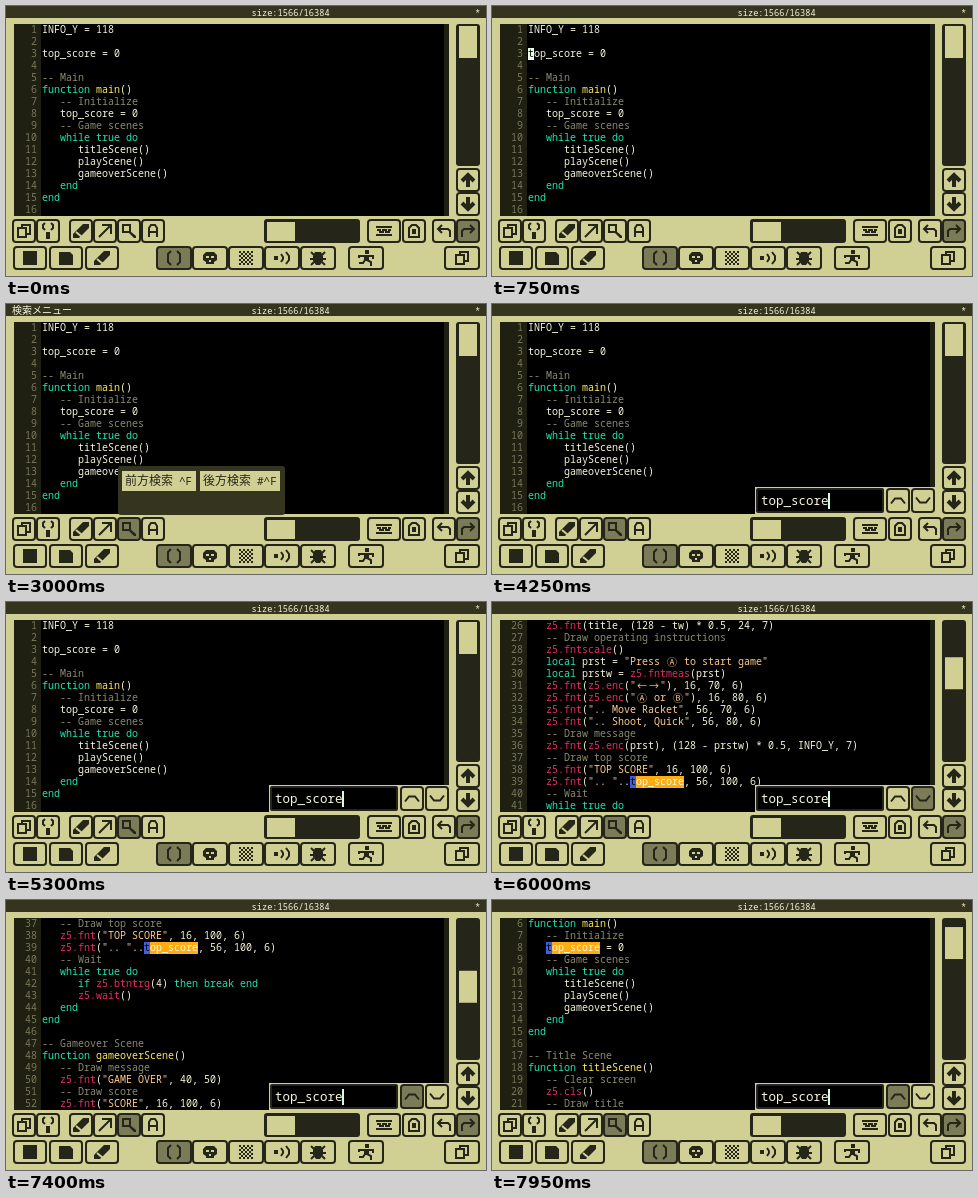
An HTML page with a canvas that plays this animation: 480x270 px, repeating every 8 s.

```html
<!DOCTYPE html>
<html lang="ja">
<head>
<meta charset="utf-8">
<title>Code search</title>
<style>
  html, body { margin: 0; width: 100%; height: 100%; overflow: hidden; background: #d0d094; }
  canvas { display: block; width: 480px; height: 270px; }
</style>
</head>
<body>
<canvas id="stage" width="480" height="270"></canvas>
<script>
const ctx = document.getElementById('stage').getContext('2d');
const LOOP = 8000, ROW = 12, COL = 6, LEFT = 36, TOP = 18, ROWS = 16;
const QUERY = 'top_score';
const MONO = '"Noto Sans Mono", monospace';
const WIDE = '"Noto Sans CJK JP", "Noto Sans CJK", sans-serif';
const INK = '#25251a', BAR = '#34341f', PAPER = '#d0d094', DIM = '#7b7b58', PALE = '#f6f5da';
const MENU_OPEN = 2500, MENU_CLOSE = 3500;

// Blocks of script, keyed by the number of their first line.
const blocks = {
1: `INFO_Y = 118

top_score = 0

-- Main
function main()
   -- Initialize
   top_score = 0
   -- Game scenes
   while true do
      titleScene()
      playScene()
      gameoverScene()
   end
end

-- Title Scene
function titleScene()
   -- Clear screen
   z5.cls()
   -- Draw title`,
26: `   z5.fnt(title, (128 - tw) * 0.5, 24, 7)
   -- Draw operating instructions
   z5.fntscale()
   local prst = "Press Ⓐ to start game"
   local prstw = z5.fntmeas(prst)
   z5.fnt(z5.enc("←→"), 16, 70, 6)
   z5.fnt(z5.enc("Ⓐ or Ⓑ"), 16, 80, 6)
   z5.fnt(".. Move Racket", 56, 70, 6)
   z5.fnt(".. Shoot, Quick", 56, 80, 6)
   -- Draw message
   z5.fnt(z5.enc(prst), (128 - prstw) * 0.5, INFO_Y, 7)
   -- Draw top score
   z5.fnt("TOP SCORE", 16, 100, 6)
   z5.fnt(".. "..top_score, 56, 100, 6)
   -- Wait
   while true do
      if z5.btntrg(4) then break end
      z5.wait()
   end
end

-- Gameover Scene
function gameoverScene()
   -- Draw message
   z5.fnt("GAME OVER", 40, 50)
   -- Draw score
   z5.fnt("SCORE", 16, 100, 6)`,
59: `   -- Wait
   z5.wait(30 * 3)
end

-- Play Scene
function playScene()
   z5.cls()
   z5.fnt("PLAY", 40, 50)
   z5.wait()
   while true do
      if z5.btntrg(4) then break end
      z5.wait()
   end
   top_score = top_score + 100
end
`};
const script = [];
for (const [first, text] of Object.entries(blocks))
  text.split('\n').forEach((line, i) => script[+first + i] = line);

// Caret moves: the pressed arrow, the top line and the caret cell.
const steps = [
  { at: -500, top: 1, line: 3, col: 0 },
  { at: 5500, press: 'down', top: 1, line: 8, col: 3 },
  { at: 6000, press: 'down', top: 26, line: 39, col: 17 },
  { at: 6450, press: 'down', top: 59, line: 72, col: 3 },
  { at: 7400, press: 'up', top: 37, line: 39, col: 17 },
  { at: 7900, press: 'up', top: 6, line: 8, col: 3 },
];

const syntax = [
  [/^--.*/, '#8a8a70'],
  [/^"[^"]*"/, '#ffca8a'],
  [/^z5\.\w+/, '#e62c62'],
  [/^(function|local|while|do|end|if|then|break|true)\b/, '#1fe4ae'],
  [/^\w+/, PALE],
  [/^./u, PALE],
];

function box(x, y, w, h, color, r = 0) {
  ctx.fillStyle = color;
  ctx.beginPath();
  ctx.roundRect(x, y, w, h, r);
  ctx.fill();
}

function label(text, x, y, size, color, family = MONO) {
  ctx.font = `${size}px ${family}`;
  ctx.fillStyle = color;
  ctx.fillText(text, x, y);
}

function codeLine(line, y, lit, caret) {
  const marks = [];
  if (lit) for (let i = line.indexOf(QUERY); i >= 0; i = line.indexOf(QUERY, i + 1)) {
    marks.push(i);
    box(LEFT + i * COL, y, QUERY.length * COL, ROW, '#ffab12');
  }
  if (caret >= 0) box(LEFT + caret * COL, y, COL, ROW, lit ? '#405cec' : '#eaffe8');
  let rest = line, col = 0, named = false;
  while (rest) {
    const [rule, base] = syntax.find(([re]) => re.test(rest));
    const token = rest.match(rule)[0];
    const color = named && /\w/.test(token) ? '#ffe95c' : base;
    if (token.trim()) named = token === 'function';
    for (const ch of token) {
      const wide = ch > '\u2000';
      const marked = marks.some(m => col >= m && col < m + QUERY.length);
      const ink = col === caret ? '#0c0c04' : marked ? '#fffbe0' : color;
      const x = LEFT + col * COL;
      if (wide) label(ch, x + 1, y + 9.5, 10, ink, WIDE);
      else if (ch !== ' ') label(ch, x, y + 9, 10, ink);
      col += wide ? 2 : 1;
    }
    rest = rest.slice(token.length);
  }
}

// Icon outlines around their centre; f = filled, s = stroked, c = cut out.
const icons = {
  copy: { s: 'M-2-3V-6H6V3H2M-6-3H2V6H-6Z' },
  braces: { s: 'M-3-8L-5-6V-3L-3-1M3-8L5-6V-3L3-1M-1 2H1V7H-1Z' },
  pencil: { f: 'M-8 7V3L2-7H8V-3L-2 7Z', c: 'M-5 1L1 6' },
  arrow: { s: 'M-6 6L5-5M-3-6H6V3' },
  find: { s: 'M-6-6H1V1H-6Z', f: 'M1 0L7 5V7H5L0 2Z' },
  letter: { s: 'M-4 6V-3L-2-6H2L4-3V6M-4 1H4' },
  keys: { s: 'M-8-4H8M-8 4H8M-7-1H-4V1H-1V-1H2V1H5V-1H7' },
  bag: { s: 'M-5 6V-3L-2-6H2L5-3V6Z', f: 'M-2-2H2V3H-2Z' },
  undo: { s: 'M-2-6L-6-2L-2 2M-6-2H4L6 0V6' },
  redo: { s: 'M2-6L6-2L2 2M6-2H-4L-6 0V6' },
  mark: { f: 'M-7-7H7V7H-7Z' },
  file: { f: 'M-7-6H4L7-3V7H-7Z' },
  parens: { s: 'M-3-7L-6-4V4L-3 7M3-7L6-4V4L3 7' },
  skull: { f: 'M-7-3L-4-6H4L7-3V2L4 4V6H-4V4L-7 2Z', c: 'M-4-1H-1M1-1H4M-1 3H1' },
  sound: { f: 'M-8-2H-4V2H-8Z', s: 'M-1-4L1-1V1L-1 4M4-6L7-2V2L4 6' },
  bug: { f: 'M-3-6H3L5-2V3L2 7H-2L-5 3V-2Z', s: 'M-7-6L-4-3M7-6L4-3M-8 1H8M-7 7L-4 4M7 7L4 4' },
  run: { f: 'M-1-8H3V-4H-1ZM-2-3H3V3H-2Z', s: 'M-7 0V-2H7V1M1 2L5 4V8M-1 2L-3 5H-7' },
  up: { s: 'M0 7V-5M-6 1L0-5L6 1', width: 4 },
  down: { s: 'M0-7V5M-6-1L0 5L6-1', width: 4 },
  prev: { s: 'M-7 3L-3-2H3L7 3' },
  next: { s: 'M-7-3L-3 2H3L7-3' },
};

function icon(name, x, y) {
  ctx.save();
  ctx.translate(x, y);
  if (name === 'grid') {
    for (let i = 0; i < 49; i += 2) box(i % 7 * 2 - 7, Math.floor(i / 7) * 2 - 7, 2, 2, INK);
  } else {
    const { s, f, c, width = 2 } = icons[name];
    ctx.lineWidth = width;
    ctx.strokeStyle = ctx.fillStyle = INK;
    if (f) ctx.fill(new Path2D(f));
    if (s) ctx.stroke(new Path2D(s));
    ctx.strokeStyle = PAPER;
    if (c) ctx.stroke(new Path2D(c));
  }
  ctx.restore();
}

function button(name, cx, cy, w, h, dim) {
  const x = cx - w / 2, y = cy - h / 2;
  box(x, y, w, h, INK, 4);
  box(x + 2, y + 2, w - 4, h - 4, dim ? DIM : PAPER, 2);
  icon(name, cx, cy);
}

const row = (names, x, gap, y, w, dimmed) =>
  names.split(' ').forEach((name, i) => button(name, x + i * gap, y, w, 24, name === dimmed));

function toolbars(searching) {
  row('copy braces', 18, 24, 225, 24);
  row('pencil arrow find letter', 75, 24, 225, 24, searching && 'find');
  box(258, 213, 96, 24, INK, 3);
  box(261, 216, 28, 19, PAPER);
  button('keys', 378, 225, 34, 24);
  button('bag', 408, 225, 24, 24);
  row('undo redo', 438, 24, 225, 24, 'redo');
  row('mark file pencil', 24, 36, 252, 34);
  row('parens skull grid sound bug', 168, 36, 252, 36, 'parens');
  button('run', 360, 252, 36, 24);
  button('copy', 456, 252, 36, 24);
}

function editor(t, step) {
  box(8, TOP, 435, ROWS * ROW, '#1f1f12');
  box(LEFT - 1, TOP, 403, ROWS * ROW, '#000');
  const caretOn = (t - step.at) % 1000 < 500;
  for (let i = 0; i < ROWS; i++) {
    const n = step.top + i, y = TOP + i * ROW;
    ctx.textAlign = 'right';
    label(n, 31, y + 9, 10, '#78785a');
    ctx.textAlign = 'left';
    codeLine(script[n] || '', y, !!step.press, caretOn && n === step.line ? step.col : -1);
  }
  box(450, TOP, 24, 142, INK, 3);
  box(453, 20 + (step.top - 1) * 1.41, 18, 32, PAPER);
  button('up', 462, 174, 24, 24);
  button('down', 462, 198, 24, 24);
}

function searchMenu() {
  box(112, 162, 167, 49, BAR, 3);
  [['前方検索', '^F', 116, 74], ['後方検索', '#^F', 194, 80]].forEach(([name, key, x, w]) => {
    box(x, 167, w, 20, PAPER);
    label(name, x + 3, 181, 12, INK, WIDE);
    label(key, x + 57, 181, 11, INK);
  });
  label('検索メニュー', 6, 10, 10, PALE, WIDE);
}

function searchField(pressed) {
  box(263, 183, 181, 28, PAPER);
  box(264, 184, 128, 25, INK, 2);
  box(266, 186, 124, 21, '#000');
  label(QUERY, 269, 201, 12.5, PALE);
  box(336, 189, 2, 16, '#d4ffe0');
  button('prev', 406, 196.5, 24, 25, pressed === 'up');
  button('next', 431, 196.5, 24, 25, pressed === 'down');
}

function draw(t) {
  const step = steps.filter(s => s.at <= t).pop();
  box(0, 0, 480, 270, PAPER);
  box(0, 0, 480, 12, BAR);
  label('size:1566/16384', 245.5, 9.5, 8.7, PALE);
  label('*', 469, 10, 8.7, PALE);
  editor(t, step);
  toolbars(t >= MENU_OPEN);
  if (t >= MENU_CLOSE) searchField(t - step.at < 200 && step.press);
  else if (t >= MENU_OPEN) searchMenu();
}

const start = performance.now();
function tick() {
  draw((performance.now() - start) % LOOP);
  requestAnimationFrame(tick);
}
tick();
</script>
</body>
</html>
```
